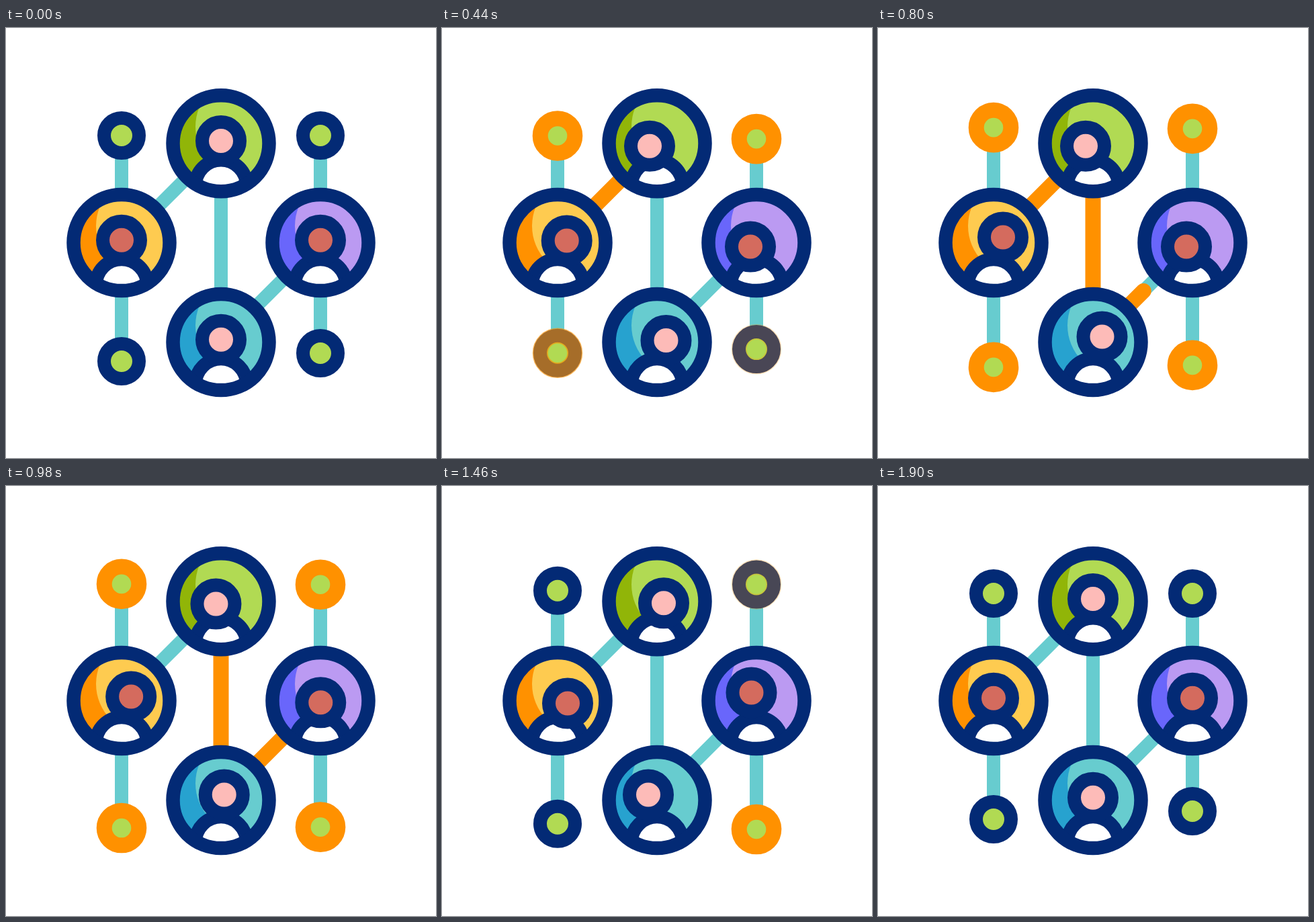
Write an HTML page that moves like this. It is 640x640 px and loops after 2.2 s.

```html
<!DOCTYPE html>
<html lang="en">
<head>
<meta charset="utf-8">
<title>Network of people</title>
<style>
  html, body { margin: 0; width: 100%; height: 100%; overflow: hidden; background: #fff; }
  svg { display: block; width: 100%; height: 100%; }
</style>
</head>
<body>
<svg id="stage" viewBox="0 0 640 640" fill="none">
  <defs><clipPath id="inside"><circle r="66"/></clipPath></defs>
</svg>
<script>
const LOOP = 2200, STEP = 20, BEGIN = 100;
const NAVY = '#032a75', TEAL = '#67cccf', ORANGE = '#ff9100', LIME = '#b1da53';
const PINK = '#fdbbb8', BROWN = '#d46b5e';
const LEFT = 172, MIDDLE = 320, RIGHT = 468;

const stage = document.getElementById('stage');

function add(parent, tag, attrs) {
  const el = document.createElementNS('http://www.w3.org/2000/svg', tag);
  for (const key in attrs) el.setAttribute(key, attrs[key]);
  return parent.appendChild(el);
}

const move = (el, x, y) => el.setAttribute('transform', `translate(${x} ${y})`);
const mix = (a, b, u) => a + (b - a) * u;
const part = (t, start, length) => Math.min(1, Math.max(0, (t - start) / length));
const ease = (t, start, length) => (1 - Math.cos(Math.PI * part(t, start, length))) / 2;
const easeOut = (t, start, length) => 1 - Math.pow(1 - part(t, start, length), 3.1);
const bump = (t, peak, half) => ease(t, peak - half, half) - ease(t, peak, half);

// Satellites pull in, fly out, pull in again and settle, one after another.
const nodes = [160, 496, 160, 484].map((rest, i) => {
  const low = i % 2, column = i >> 1;
  return {
    x: column ? RIGHT : LEFT, rest,
    near: low ? 478 : 166.4, far: low ? 511 : 145,
    delay: 40 * i, on: 365 + 40 * low + 20 * column
  };
});

// Each head looks at three points in turn; turn is when it leaves the second.
const people = [
  { x: MIDDLE, y: 171.8, light: LIME, dark: '#91b508', face: PINK,
    looks: [[-11, 4], [-11, 4], [10, 2.5]], turn: 895, dip: 3.5 },
  { x: LEFT, y: 319.6, light: '#fecb50', dark: ORANGE, face: BROWN,
    looks: [[13.7, -3], [14, -8], [15, 4]], turn: 895, sway: -26, swayAt: [260] },
  { x: RIGHT, y: 319.6, light: '#bb9af2', dark: '#6966fb', face: BROWN,
    looks: [[-9, 6], [-9, 6], [-7.5, -12]], turn: 890, dip: 3.5, sway: 9, swayAt: [980, 1730] },
  { x: MIDDLE, y: 467.6, light: TEAL, dark: '#27a2cf', face: PINK,
    looks: [[13.5, -2.5], [13.5, -8], [-13, -8]], turn: 855 }
];
const REST = [0, -3.8];

const route = 'M172 320 320 172V466.6L468 318.6';
const lines = { stroke: TEAL, 'stroke-width': 20 };

for (const n of nodes) n.line = add(stage, 'path', lines);
const track = add(stage, 'path', { d: route, ...lines });
const pulse = add(stage, 'path', {
  d: route, stroke: ORANGE, 'stroke-width': 23, 'stroke-linecap': 'round', 'stroke-linejoin': 'round'
});
const routeLength = track.getTotalLength();

for (const n of nodes) {
  n.group = add(stage, 'g', {});
  add(n.group, 'circle', { r: 26, fill: LIME, stroke: NAVY, 'stroke-width': 20 });
  n.glow = add(n.group, 'circle', { r: 25.8, stroke: ORANGE, 'stroke-width': 23 });
}

for (const p of people) {
  const group = add(stage, 'g', {});
  move(group, p.x, p.y);
  const inner = add(group, 'g', { 'clip-path': 'url(#inside)' });
  add(inner, 'circle', { r: 66, fill: p.dark });
  add(inner, 'circle', { cx: 37, cy: -25, r: 75, fill: p.light });
  add(inner, 'circle', { cy: 62.7, r: 38, fill: '#fff', stroke: NAVY, 'stroke-width': 20 });
  p.head = add(inner, 'circle', { r: 28, fill: p.face, stroke: NAVY, 'stroke-width': 20 });
  add(group, 'circle', { r: 71.5, stroke: NAVY, 'stroke-width': 20.5 });
}

function nodeHeight(n, t) {
  const s = t - n.delay - BEGIN;
  const pulled = mix(n.rest, n.near, ease(s, 0, 240) - ease(s, 1480, 200));
  return mix(pulled, n.far, easeOut(s, 240, 1000) * (1 - ease(s, 1240, 240)));
}

function headPlace(p, t) {
  const [first, second, third] = p.looks;
  const legs = [
    [first, ease(t, BEGIN, 320)],
    [second, ease(t, 440, 360)],
    [third, ease(t, p.turn, 320)],
    [REST, ease(t, 1640, 180)]
  ];
  let [x, y] = REST;
  for (const [to, u] of legs) {
    x = mix(x, to[0], u);
    y = mix(y, to[1], u);
  }
  for (const at of p.swayAt || []) x += p.sway * bump(t, at, 110);
  if (p.dip) y += p.dip * bump(t, 1630, 150);
  return [x, y];
}

function draw(t) {
  for (const n of nodes) {
    const y = nodeHeight(n, t);
    n.line.setAttribute('d', `M${n.x} 320V${y}`);
    move(n.group, n.x, y);
    n.glow.setAttribute('opacity', part(t, n.on, 54) - part(t, 1340 + n.delay, 55));
  }
  for (const p of people) move(p.head, ...headPlace(p, t));

  const front = ease(t, BEGIN, 931) * routeLength;
  const tail = ease(t, 628, 931) * routeLength;
  pulse.setAttribute('stroke-dasharray', `0 ${tail} ${front - tail} 2000`);
  pulse.setAttribute('visibility', front > tail ? 'visible' : 'hidden');
}

const began = performance.now();
function frame() {
  const t = (performance.now() - began) % LOOP;
  draw(t - t % STEP);
  requestAnimationFrame(frame);
}
draw(0);
requestAnimationFrame(frame);
</script>
</body>
</html>
```
